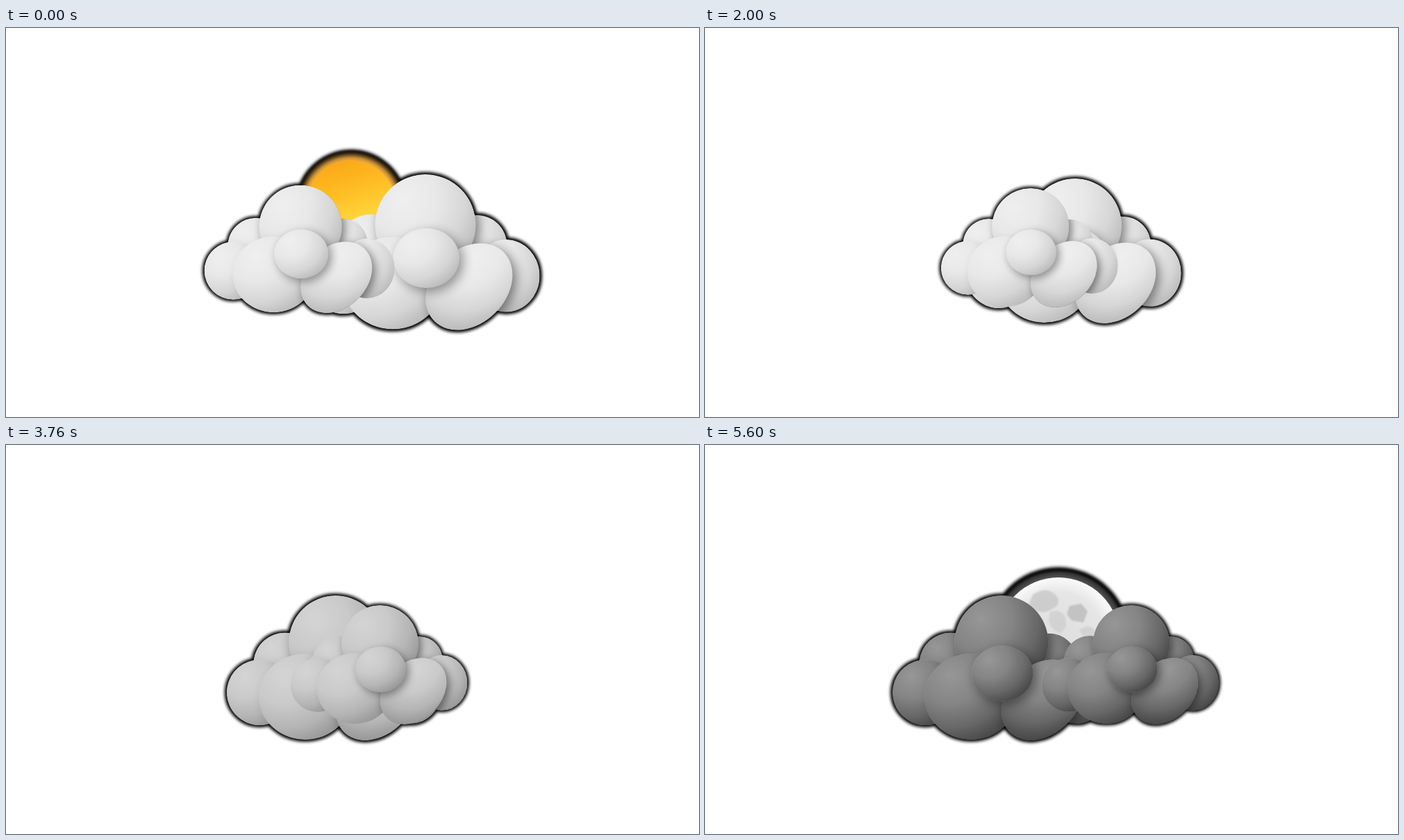
An HTML page for the animation above (5840 ms loop, 998 by 561 pixels).

```html
<!DOCTYPE html>
<html lang="en">
<head>
<meta charset="utf-8">
<title>Clouds from day to night</title>
<style>
html, body { margin: 0; width: 100%; height: 100%; overflow: hidden; background: #fff; }
svg { display: block; width: 100vw; height: 100vh; }
</style>
</head>
<body>
<svg viewBox="0 0 998 561" xmlns="http://www.w3.org/2000/svg">
  <defs>
    <radialGradient id="lobe" cx=".28" cy=".25" r=".95">
      <stop offset="0" stop-color="#efefef"/>
      <stop offset=".36" stop-color="#e8e8e8"/>
      <stop offset=".65" stop-color="#d6d6d6"/>
      <stop offset=".85" stop-color="#bebebe"/>
      <stop offset="1" stop-color="#a4a4a4"/>
    </radialGradient>
    <radialGradient id="night" cx=".28" cy=".25" r=".95">
      <stop offset="0" stop-opacity=".37"/>
      <stop offset=".36" stop-opacity=".43"/>
      <stop offset=".65" stop-opacity=".52"/>
      <stop offset=".85" stop-opacity=".61"/>
      <stop offset="1" stop-opacity=".7"/>
    </radialGradient>
    <linearGradient id="sunFill" x1=".3" y1="0" x2=".6" y2="1">
      <stop offset="0" stop-color="#fba616"/>
      <stop offset=".35" stop-color="#ffbd24"/>
      <stop offset=".65" stop-color="#ffd43a"/>
      <stop offset="1" stop-color="#ffc22a"/>
    </linearGradient>
    <radialGradient id="sunGlow">
      <stop offset=".78" stop-color="#fbb43c"/>
      <stop offset=".85" stop-color="#c98f38"/>
      <stop offset=".92" stop-color="#4c3718"/>
      <stop offset="1" stop-color="#0c0903" stop-opacity="0"/>
    </radialGradient>
    <radialGradient id="moonGlow">
      <stop offset=".85" stop-color="#575757"/>
      <stop offset=".93" stop-color="#353535"/>
      <stop offset="1" stop-color="#0a0a0a" stop-opacity="0"/>
    </radialGradient>
    <radialGradient id="moonFill">
      <stop offset="0" stop-color="#dedede"/>
      <stop offset=".75" stop-color="#e6e6e6"/>
      <stop offset="1" stop-color="#fafafa"/>
    </radialGradient>
    <filter id="soft" x="-30%" y="-30%" width="160%" height="160%"><feGaussianBlur stdDeviation="6"/></filter>
    <filter id="rim" x="-10%" y="-10%" width="120%" height="120%"><feGaussianBlur stdDeviation="2.3"/></filter>
    <filter id="edge"><feGaussianBlur stdDeviation=".9"/></filter>
    <clipPath id="cloudClip"></clipPath>
    <clipPath id="upper"><rect width="998" height="308"/></clipPath>
    <g id="shape"></g>
    <g id="cloud" clip-path="url(#cloudClip)"></g>
  </defs>

  <g filter="url(#rim)" stroke="#000" stroke-width="5">
    <use href="#shape" class="back"/>
    <use href="#shape" class="front"/>
    <g clip-path="url(#upper)" stroke="none">
      <circle class="sun" r="81"/>
      <circle class="moon" r="103"/>
    </g>
  </g>

  <g clip-path="url(#upper)">
    <g class="sun">
      <circle r="81" fill="url(#sunGlow)"/>
      <circle r="65" fill="url(#sunFill)" filter="url(#edge)"/>
    </g>
    <g class="moon">
      <circle r="102" fill="url(#moonGlow)"/>
      <circle r="88" fill="url(#moonFill)"/>
      <g filter="url(#edge)" fill="#c3c3c3">
        <path d="M-37-63Q-20-75-8-66Q4-58-2-47Q-12-40-20-38Q-37-38-42-50Z" opacity=".7"/>
        <path d="M16-47L33-50L42-39L36-23L19-26L12-35Z"/>
        <path d="M-12-38Q4-44 10-30Q14-14 2-8Q-12-14-14-26Z" opacity=".5"/>
        <path d="M30-12Q44-22 52-12Q52 2 40 4Z" opacity=".5"/>
      </g>
    </g>
  </g>

  <use href="#cloud" class="back"/>
  <use href="#cloud" class="front"/>
</svg>
<script>
const STEP = 80, LOOP = 5840, LAST = 70;
const W = 255, H = 171;

// cx, cy, rx, ry, turn, shadow strength; far lobes first
const lobes = [
  [69, 81.5, 37.5, 37.5, 0, 0],
  [186, 78, 33, 33, 0, 0],
  [39, 115, 39, 39, 0, .1],
  [218, 112, 37, 40, 0, .15],
  [129, 55.5, 55.5, 55.5, 0, .48],
  [93, 120, 55, 51, 0, .1],
  [177, 124, 41, 54, 45, .48],
  [130, 92.5, 36.5, 33, 0, .38]
];

const $ = id => document.getElementById(id);
const all = name => document.querySelectorAll('.' + name);

function addLobe(parent, [cx, cy, rx, ry, turn], attrs = {}) {
  const el = document.createElementNS('http://www.w3.org/2000/svg', 'ellipse');
  Object.entries({ cx, cy, rx, ry, transform: `rotate(${turn} ${cx} ${cy})`, ...attrs })
    .forEach(([k, v]) => el.setAttribute(k, v));
  parent.appendChild(el);
}

for (const lobe of lobes) {
  const [cx, cy, rx, ry, turn, shade] = lobe;
  const cloud = $('cloud');
  addLobe($('shape'), lobe);
  addLobe($('cloudClip'), lobe);
  if (shade) {
    addLobe(cloud, [cx + 4, cy + 4, rx, ry, turn], { opacity: shade, filter: 'url(#soft)' });
  }
  addLobe(cloud, lobe, { fill: 'url(#lobe)' });
  addLobe(cloud, lobe, { fill: 'url(#night)', class: 'dusk' });
}

const place = (name, transform) =>
  all(name).forEach(el => el.setAttribute('transform', transform));
const show = (name, on) =>
  all(name).forEach(el => el.setAttribute('visibility', on ? 'visible' : 'hidden'));

// Moves from a to b over the first 33 steps, then on to c at 66
const travel = (n, a, b, c) => n < 33 ? a + (b - a) * n / 33 : b + (c - b) * (n - 33) / 33;

function placeCloud(name, x, y, size, grow) {
  const cx = x + W * size / 2, cy = y + H * size / 2 + grow * 24;
  place(name, `translate(${cx} ${cy}) scale(${size * (1 + grow)}) translate(${-W / 2} ${-H / 2})`);
}

function draw(time) {
  const step = Math.min(LAST, Math.floor((time % LOOP) / STEP));
  const late = Math.max(0, step - 62);
  const n = step - late * late / 16;
  const grow = .075 * Math.max(0, 1 - step / 9) ** 2;

  placeCloud('back', travel(n, 447, 353, 270), 217, 1.216, grow);
  placeCloud('front', travel(n, 295, 354, 485), 231, 1, grow);

  place('sun', `translate(497 ${256 + 4.1 * n})`);
  show('sun', step < 24);
  place('moon', `translate(509 ${308 - 2.9 * (n - 56)})`);
  show('moon', step > 38);

  const dusk = Math.max(0, step - 37) / (LAST - 37);
  all('dusk').forEach(el => el.setAttribute('opacity', dusk));
}

const start = performance.now();
function tick() {
  draw(performance.now() - start);
  requestAnimationFrame(tick);
}
tick();
</script>
</body>
</html>
```
